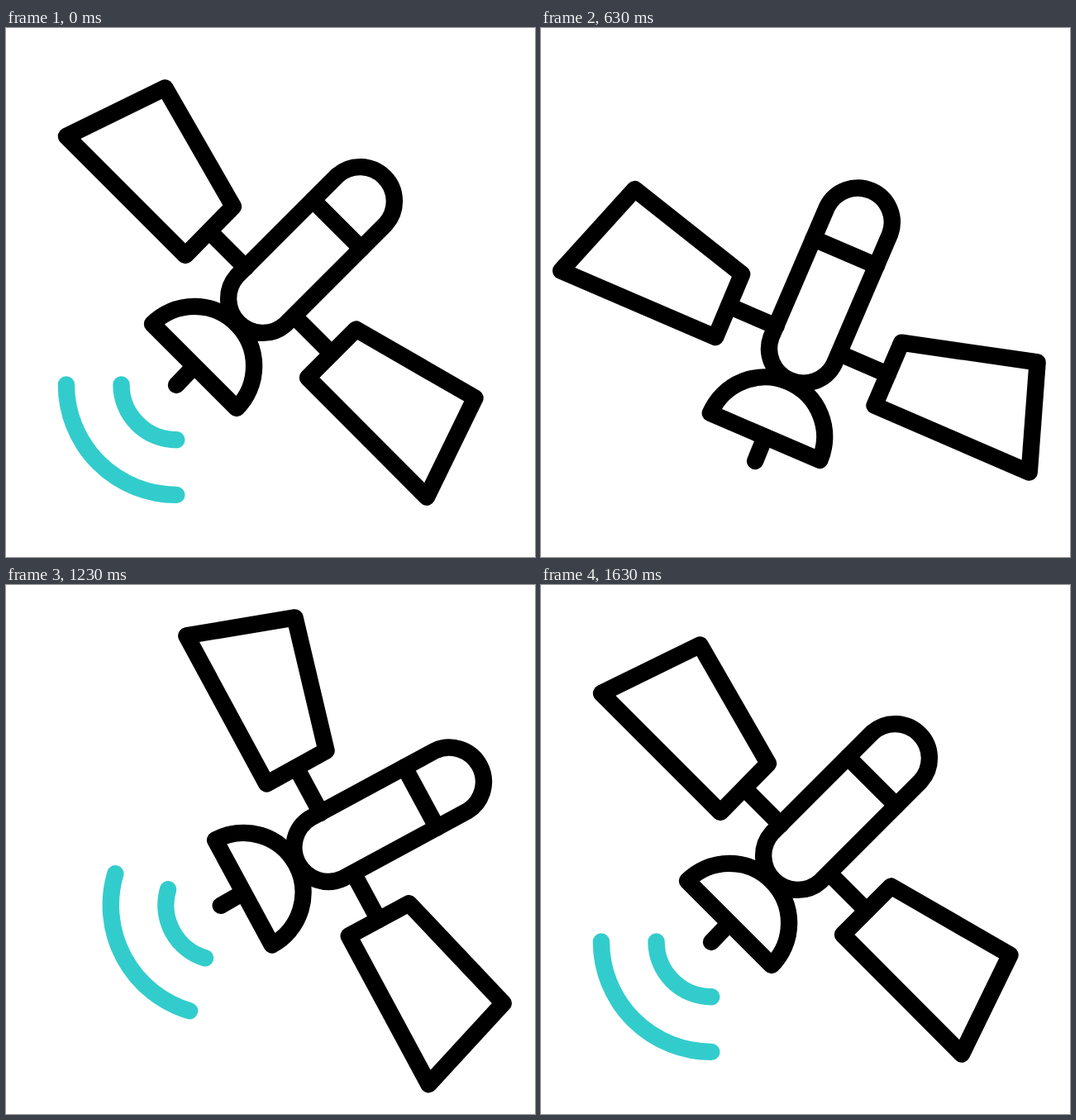
Recreate the animation shown at these times as an HTML page. Size 640 by 640 pixels, loop 1670 ms.

```html
<!DOCTYPE html>
<html lang="en">
<head>
<meta charset="utf-8">
<title>Satellite</title>
<style>
  html, body { margin: 0; width: 100%; height: 100%; overflow: hidden; background: #fff; }
  svg { display: block; width: 100%; height: 100%; }
  path { fill: none; stroke: #000; stroke-width: 20.4; stroke-linecap: round; stroke-linejoin: round; }
  .wave { stroke: #33cccc; }
</style>
</head>
<body>
<svg viewBox="0 0 640 640">
  <g id="satellite">
    <path d="M192.5 72.5 73 131 217 275 275 216Z"/>
    <path d="M423.5 364.5 567.5 447.5 509 567.5 365 423Z"/>
    <path d="M246 246 290 290M349 349 394 394"/>
    <path d="M400.7 178.7A41.5 41.5 0 0 1 459.3 237.3L338.3 358.3A41.5 41.5 0 0 1 279.7 299.7Z"/>
    <path d="M371.2 208.2 429.9 266.9"/>
    <path d="M177 358A72 72 0 0 1 279 460ZM228 409 206 432"/>
    <path id="inner" class="wave"/>
    <path id="outer" class="wave"/>
  </g>
</svg>
<script>
const LOOP = 1670, FRAME = 100 / 3, LAST = 49;
const ANTENNA = { x: 206.3, y: 431.5 };

// frame, angle, x shift, y shift
const POSES = [
  [0, 0, 0, 0],
  [4, -2, -1.2, 5.2],
  [8, -7.9, -3.3, 21.2],
  [13, -18.6, -1.8, 50],
  [17, -22.2, 1.3, 58.5],
  [19, -21.75, 3.5, 57.7],
  [26, -0.53, 49.7, 30.7],
  [32, 17.6, 89, -3],
  [33.3, 19.4, 95, -7.5],
  [37, 16.6, 81, -7],
  [41, 9.64, 47.5, -5.6],
  [45, 3, 15, -2],
  [49, 0, 0, 0]
];

const byId = id => document.getElementById(id);
const clamp = v => Math.min(1, Math.max(0, v));
const ramp = (f, from, to) => clamp((f - from) / (to - from));
const smooth = (f, from, to) => { const u = ramp(f, from, to); return u * u * (3 - 2 * u); };
const mix = (a, b, u) => a + (b - a) * u;

function slope(i, channel) {
  if (i === 0 || i === POSES.length - 1) return 0;
  const rate = k => (POSES[k + 1][channel] - POSES[k][channel]) / (POSES[k + 1][0] - POSES[k][0]);
  const a = rate(i - 1), b = rate(i);
  return a * b <= 0 ? 0 : 2 * a * b / (a + b);
}

// monotone cubic through the poses
function pose(f, channel) {
  let i = 0;
  while (i < POSES.length - 2 && f >= POSES[i + 1][0]) i++;
  const a = POSES[i], b = POSES[i + 1], span = b[0] - a[0];
  const u = (f - a[0]) / span, v = 1 - u;
  return v * v * (1 + 2 * u) * a[channel] + u * u * (3 - 2 * u) * b[channel]
    + span * u * v * (v * slope(i, channel) - u * slope(i + 1, channel));
}

function drawWave(id, dx, dy, r, opacity) {
  const x = ANTENNA.x + dx, y = ANTENNA.y + dy, path = byId(id);
  path.setAttribute("d", `M${x - r} ${y}A${r} ${r} 0 0 0 ${x} ${y + r}`);
  path.setAttribute("opacity", opacity);
}

function draw(f) {
  const [angle, x, y] = [1, 2, 3].map(channel => pose(f, channel));
  byId("satellite").setAttribute("transform", `translate(${x} ${y}) rotate(${angle} 320 320)`);

  if (f < 20) {
    // the waves drift away and fade, outer one first
    const away = smooth(f, 0, 16);
    drawWave("inner", -32.6 * away, 35.8 * away, 66.8, 1 - ramp(f, 9, 13));
    drawWave("outer", -32.6 * away, 22.8 * away, 133.4, 1 - ramp(f, 5, 9));
  } else {
    // new waves grow out of the antenna
    const grow = smooth(f, 29, 37);
    drawWave("inner", 0, 0, mix(6, 66.8, smooth(f, 27, 37)), ramp(f, 27, 30));
    drawWave("outer", -18 * (1 - grow), 17 * (1 - grow), mix(14, 133.4, grow), ramp(f, 29.7, 33.7));
  }
}

function tick() {
  const time = performance.now() % LOOP;
  draw(Math.min(LAST, Math.floor((time + 3.4) / FRAME)));
  requestAnimationFrame(tick);
}
tick();
</script>
</body>
</html>
```
